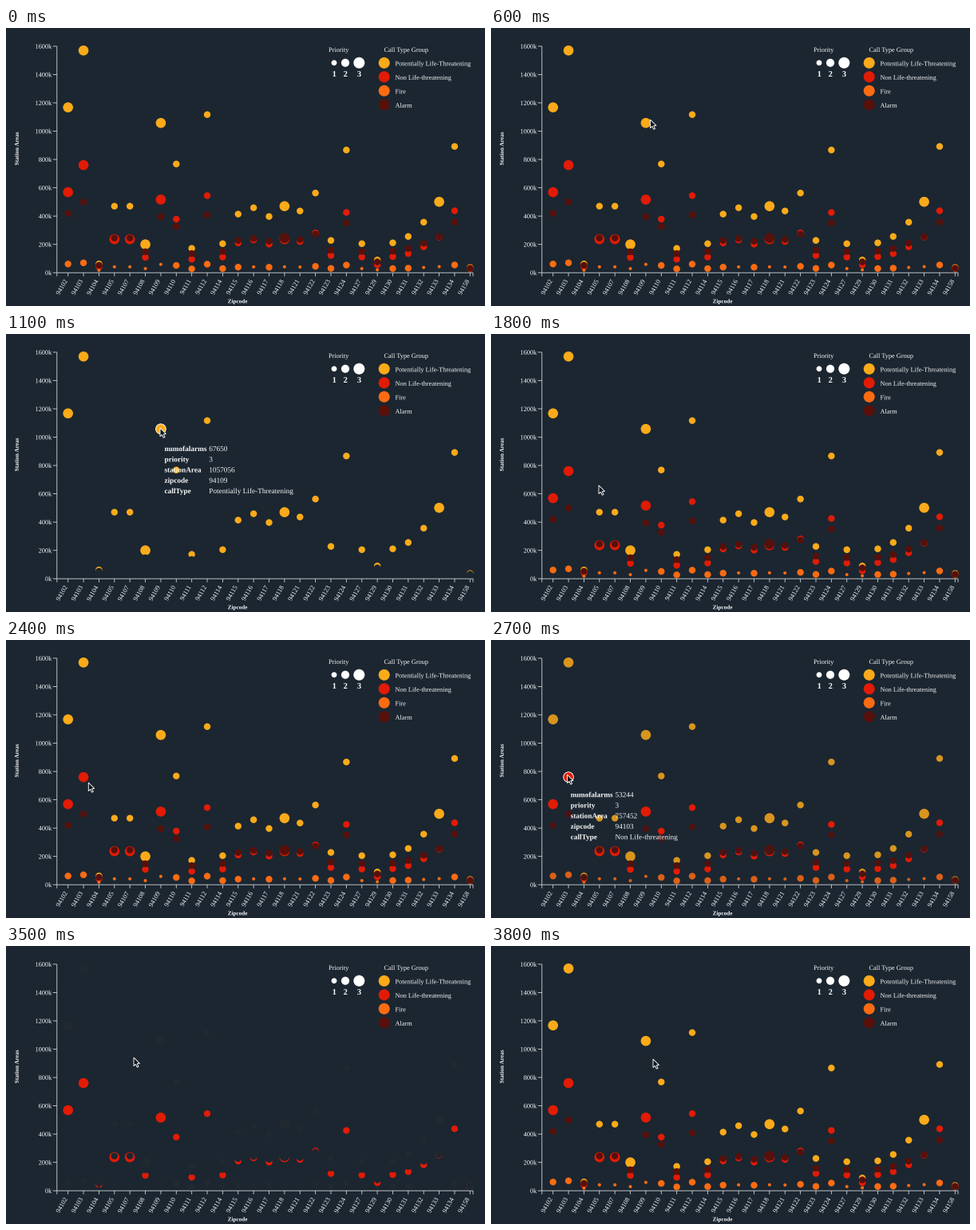
A matplotlib script that plays this animation: 600 px wide and 349 px high, repeating every 3.9 s.

```python
import numpy as np
import matplotlib.pyplot as plt
from matplotlib.animation import FuncAnimation
from matplotlib.collections import PatchCollection
from matplotlib.colors import to_rgb
from matplotlib.patches import Circle, PathPatch, Polygon
from matplotlib.textpath import TextPath
from matplotlib.transforms import Affine2D

W, H, DPI = 600, 349, 64
STEP, FRAMES = 100, 39
PT = 72 / DPI  # points per pixel
BG, INK = "#1b2631", "#f6f7f7"
LEFT, RIGHT, BASE = 63.8, 585, 307.2
PER_K = 284.3 / 1600  # pixels per thousand
FADE_IN, FADE_OUT = 500, 340

plt.rcParams["path.snap"] = False

UNUSED = {106, 113, 119, 120, 125, 126, 128}
ZIPS = [z for z in range(102, 135) if z not in UNUSED] + [158]
XS = 77.7 + 19.37 * np.arange(len(ZIPS))

# calls in thousands; the other groups follow from the busiest one
CALLS = np.array([1168, 1570, 62, 470, 470, 200, 1058, 768, 172, 1117, 205, 414,
                  459, 397, 470, 436, 563, 228, 867, 205, 90, 211, 256, 357, 501,
                  892, 37])
RADII = {1: 2.0, 2: 4.2, 3: 6.3}


class Group:
    def __init__(self, name, color, calls, high=(), low=()):
        self.name, self.color = name, color
        self.ys = BASE - PER_K * calls
        self.radii = [RADII[2 + (z in high) - (z in low)] for z in ZIPS]


GROUPS = [
    Group("Potentially Life-Threatening", "#fbaa19", CALLS,
          high={102, 103, 108, 109, 118, 133}),
    Group("Non Life-threatening", "#e21b05", 0.476 * CALLS + 13,
          high={102, 103, 105, 107, 109, 118}),
    Group("Fire", "#fc6b12", 2.95 * CALLS ** 0.43,
          low={104, 105, 107, 108, 109, 116, 118, 121, 127, 129, 132, 133, 158}),
    Group("Alarm", "#58100b", np.minimum(0.85 * CALLS, 6.5 * CALLS ** 0.59),
          high={118}),
]

HOVERS = [
    dict(group=0, zip=109, enter=610, leave=1510, corner=(198.5, 147),
         values=("67650", "3", "1057056", "94109", "Potentially Life-Threatening")),
    dict(group=1, zip=103, enter=2530, leave=3440, corner=(99.7, 197.2),
         values=("53244", "3", "757452", "94103", "Non Life-threatening")),
]
FIELDS = ("numofalarms", "priority", "stationArea", "zipcode", "callType")

# cursor tip: time, x, y
PATH = np.array([(100, 262, 336), (600, 199.5, 115), (700, 193, 118),
                 (1500, 193, 118), (1800, 135, 190), (2100, 115, 194),
                 (2600, 95.5, 169), (3400, 95.5, 169), (3500, 160, 140),
                 (3800, 203, 142)])
ARROW = 0.94 * np.array([(0, 0), (0, 11.3), (2.6, 8.9), (4.5, 13), (6.4, 12.2),
                         (4.6, 8.2), (8, 8)])

fig = plt.figure(figsize=(W / DPI, H / DPI), dpi=DPI, facecolor=BG)
ax = fig.add_axes([0, 0, 1, 1])
ax.set_xlim(0, W)
ax.set_ylim(H, 0)
ax.axis("off")


def label(x, y, text, size=8.3, align=0, angle=0, weight="normal"):
    """Text with its baseline at y; align runs from 0 (left) to 1 (right)."""
    font = dict(family="Liberation Serif", weight=weight)
    path = TextPath((0, 0), text, size=size, prop=font)
    place = Affine2D().translate(-align * path.get_extents().x1, 0)
    place.scale(1, -1).rotate_deg(-angle).translate(x, y)
    return ax.add_patch(PathPatch(place.transform_path(path), fc=INK, lw=0, zorder=4))


def line(x, y):
    ax.plot(x, y, color="#d5d9dc", lw=0.85 * PT, zorder=1, solid_capstyle="butt")


def disc(x, y, r, color):
    ax.add_patch(Circle((x, y), r, fc=color, lw=0))


def mix(color, amount):
    return (1 - amount) * np.array(to_rgb(color)) + amount * np.array(to_rgb(BG))


def ease(p):
    p = np.clip(p, 0, 1)
    return 4 * p ** 3 if p < 0.5 else 1 - 4 * (1 - p) ** 3


def draw_axes():
    line([LEFT, LEFT], [23, BASE])
    line([LEFT, RIGHT], [BASE, BASE])
    for k in range(0, 1601, 200):
        y = BASE - PER_K * k
        line([LEFT - 5, LEFT], [y, y])
        label(57.3, y + 2.9, f"{k}k", align=1)
    for x in (LEFT, *XS, RIGHT):
        line([x, x], [BASE, BASE + 4.5])
    for x, z in zip(XS, ZIPS):
        label(x - 0.8, 318, f"94{z}", align=1, angle=60)
    label(290, 345.3, "Zipcode", 7.2, align=0.5, weight="bold")
    label(15.8, 151.5, "Station Areas", 7.3, align=0.5, angle=90, weight="bold")


def draw_legend():
    label(404, 30, "Priority")
    for n, x, r in ((1, 411, 3.4), (2, 425, 5.1), (3, 442.3, 7)):
        disc(x, 43.7, r, "white")
        label(x, 61, str(n), 10.5, align=0.5, weight="bold")
    label(473.5, 30, "Call Type Group")
    for i, group in enumerate(GROUPS):
        y = 43.8 + 17.5 * i
        disc(473.7, y, 7, group.color)
        label(487.5, y + 3.5, group.name)


def draw_dots(group, order):
    dots = [Circle(spot, r) for *spot, r in zip(XS, group.ys, group.radii)]
    return ax.add_collection(PatchCollection(dots, lw=0, zorder=2 + 0.1 * order))


def draw_hover(hover):
    group, i = GROUPS[hover["group"]], ZIPS.index(hover["zip"])
    ring = Circle((XS[i], group.ys[i]), group.radii[i], fc=group.color, ec="white",
                  lw=0.9 * PT, zorder=3)
    parts = [ax.add_patch(ring)]
    x, y = hover["corner"]
    for row, (field, value) in enumerate(zip(FIELDS, hover["values"])):
        base = y + 13.25 * row
        parts.append(label(x, base, field, 9.25, weight="bold"))
        parts.append(label(x + 55.8, base, value, 9.25))
    return parts


draw_axes()
draw_legend()
layers = [draw_dots(group, i) for i, group in enumerate(GROUPS)]
tips = [draw_hover(hover) for hover in HOVERS]
cursor = ax.add_patch(Polygon(ARROW, fc="#11161c", ec="white", lw=0.9 * PT,
                              joinstyle="miter", zorder=5))


def update(frame):
    t = frame * STEP
    fades = np.zeros(len(GROUPS))
    for hover, parts in zip(HOVERS, tips):
        for part in parts:
            part.set_visible(hover["enter"] <= t < hover["leave"])
        amount = (ease((t - hover["enter"]) / FADE_IN)
                  - ease((t - hover["leave"]) / FADE_OUT))
        fades[np.arange(len(GROUPS)) != hover["group"]] += amount
    for layer, group, amount in zip(layers, GROUPS, fades):
        layer.set_facecolor(mix(group.color, amount))
    times, xs, ys = PATH.T
    cursor.set_visible(t >= times[0])
    cursor.set_xy(ARROW + (np.interp(t, times, xs), np.interp(t, times, ys)))
    return [*layers, cursor]


anim = FuncAnimation(fig, update, frames=FRAMES, interval=STEP, repeat=True,
                     repeat_delay=0, blit=False)
plt.show()
```
